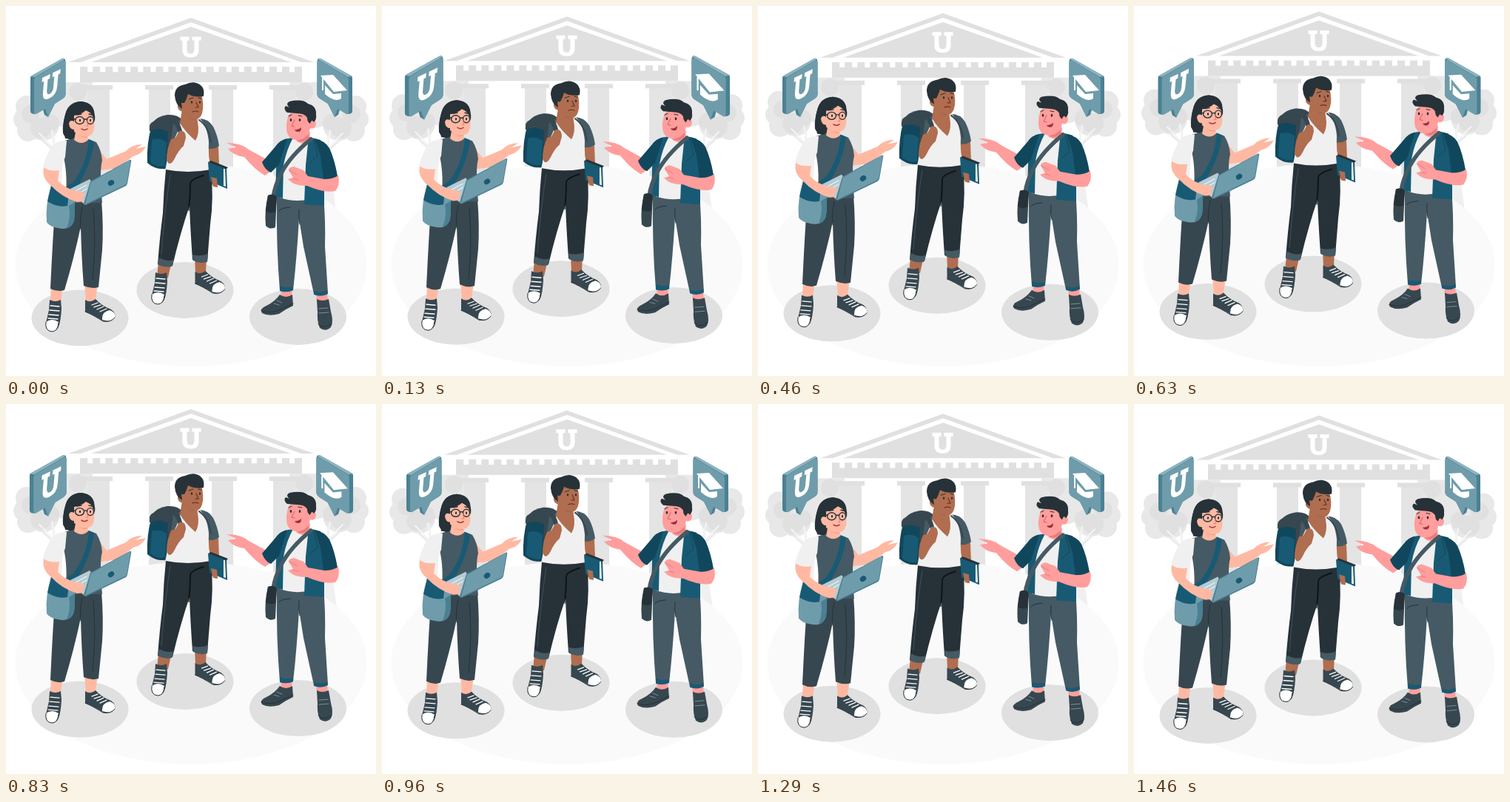
Write an HTML page that moves like this. It is 500x500 px and loops after 1500 ms.

```html
<!DOCTYPE html>
<html lang="en">
<head>
<meta charset="utf-8">
<style>
  html, body { margin: 0; width: 100%; height: 100%; overflow: hidden; background: #fff; }
  svg { display: block; width: 100vw; height: 100vh; }
  path, ellipse, circle, rect { stroke-linecap: round; stroke-linejoin: round; }
  .ink { fill: #263238; } .slate { fill: #37474f; } .steel { fill: #455a64; }
  .deep { fill: #185a74; } .dark { fill: #11475c; } .teal { fill: #6f9cab; } .mid { fill: #4b8093; }
  .white { fill: #fff; } .shirt { fill: #f0f0f0; } .grey { fill: #e0e0e0; }
  .fair { fill: #ffb9a3; } .brown { fill: #b06d4f; } .pink { fill: #ff9e9c; }
  .line { fill: none; stroke: #263238; }
  .lace { fill: none; stroke: #fff; stroke-width: 1.3; }
</style>
</head>
<body>
<svg viewBox="0 0 500 500">
<defs>
  <path id="letter" d="M-14-14h12v5h-3v12q0 6 5 6t5-6V-9H2v-5h12v5h-3V4q0 10-11 10T-11 4V-9h-3z"/>
  <g id="tree">
    <path fill="#f0f0f0" d="M53 285L66 190 78 190 72 285Z"/>
    <path fill="none" stroke="#ebebeb" stroke-width="3" d="M72 210Q68 196 52 184L38 168M70 204Q63 190 64 165M74 215Q90 180 98 150"/>
    <g fill="#e8e8e8">
      <circle cx="94" cy="104" r="23"/><circle cx="99" cy="128" r="21"/><circle cx="83" cy="142" r="23"/>
      <circle cx="28" cy="136" r="15"/><circle cx="24" cy="153" r="14"/><circle cx="30" cy="168" r="15"/>
      <circle cx="50" cy="160" r="22"/>
    </g>
    <g fill="#e0e0e0">
      <circle cx="97" cy="116" r="12"/><circle cx="33" cy="146" r="12"/>
      <circle cx="47" cy="165" r="14"/><circle cx="60" cy="158" r="12"/>
    </g>
    <path fill="none" stroke="#f5f5f5" stroke-width="2" d="M74 206Q62 188 45 172M66 191L62 168"/>
  </g>
  <g id="bubble">
    <path class="mid" d="M33 97Q33 95 35 94L75 71.500Q80 69 80.500 75V120Q80 123 77 125L66 132 57 150 52 147 50 140 39 146Q33 146 33 142Z"/>
    <path fill="#8db3bf" d="M33.500 95L75 71.500Q78 70 79.500 72L39 96Z"/>
    <path class="teal" d="M38 100Q38 97 41 95.500L77 74Q80 73 80.500 76V120Q80 123 77 125L66 132 57 150 53 139 41 146Q38 147 38 143Z"/>
  </g>
  <g id="shoeDown">
    <path class="slate" d="M59 397Q67 401 74 397L75 409Q74 426 71 434 68 440 62 440 53 439 54 428L58 411Z"/>
    <path class="white" d="M54 427Q62 421 71 427 71 440 62 440 53 439 54 427Z"/>
    <path class="lace" d="M60 405L72 406M59 411L72 412M58 417L71 418M57 422L70 423"/>
    <path class="line" d="M54 427Q52 439 62 440 70 440 71 428"/>
  </g>
  <g id="shoeSide">
    <path class="slate" d="M107 397Q114 402 121 396 129 405 142 410 149 415 147 421 142 428 132 426 117 417 107 413Z"/>
    <path class="white" d="M130 422Q130 413 140 411 149 414 147 421 142 428 130 424Z"/>
    <path class="lace" d="M116 404L124 401M119 407L128 404M123 410L132 406M127 413L136 409"/>
    <path class="line" d="M107 413Q117 417 131 426 142 428 147 421"/>
  </g>
</defs>

<g class="float">
  <use href="#tree"/>
  <use href="#tree" transform="matrix(-1 0 0 1 500 0)"/>
  <path class="white" d="M80 78L250 14 420 78V103H80Z"/>
  <path class="grey" d="M84 76L250 16 416 76H399L250 22 101 76Z"/>
  <path class="grey" d="M115 76L250 28 385 76Z"/>
  <use href="#letter" class="white" x="249.500" y="55.500"/>
  <rect class="grey" x="100" y="82" width="300" height="21"/>
  <path d="M110.200 85.500H400" fill="none" stroke="#fff" stroke-width="7.500" stroke-dasharray="7 10.050" style="stroke-linecap:butt"/>
  <path fill="#e4e4e4" d="M110 112h30v125h-30zM193 112h29v125h-29zM278 112h29v125h-29zM361 112h30v125h-30z"/>
  <path class="grey" d="M103 107h41v6h-41zM188 107h38v6h-38zM274 107h38v6h-38zM356 107h42v6h-42z"/>
</g>

<ellipse cx="250" cy="350" rx="237.500" ry="137" fill="#fafafa"/>

<g class="beat" style="transform-origin: 57px 110px">
  <use href="#bubble"/>
  <use href="#letter" class="white" transform="matrix(.88 -.42 -.1 1.2 60 108)"/>
</g>
<g class="beat" style="transform-origin: 444px 110px">
  <use href="#bubble" transform="matrix(-1 0 0 1 501 0)"/>
  <path class="white" d="M425 94L442 93 461 114 443 116ZM431 107L442 119 453 118V125Q445 131 431 119Z"/>
  <path d="M428 98V113" fill="none" stroke="#fff" stroke-width="2"/>
</g>

<g class="float">
  <g class="grey">
    <ellipse cx="100" cy="421.500" rx="65.500" ry="38"/>
    <ellipse cx="242" cy="384" rx="65.500" ry="38"/>
    <ellipse cx="394.500" cy="420" rx="65.500" ry="38"/>
  </g>

  <!-- woman with laptop -->
  <g>
    <path class="fair" d="M61 378H77L74 399Q67 403 60 399ZM106 375H124L121 397Q114 403 108 399Z"/>
    <use href="#shoeDown"/>
    <use href="#shoeSide"/>
    <path class="fair" d="M122 190L136 207 162 196Q170 187 184 187L175 193 189 190Q183 201 172 203 160 213 147 220L127 222Z"/>
    <path class="slate" d="M67 262H129Q132 300 130 330L125 380Q116 383 105 378 102 340 101 298 92 340 79 384 70 387 60 382 63 315 67 262Z"/>
    <path class="line" d="M103 271Q99 290 101 302M118 275Q122 320 117 370"/>
    <path class="ink" d="M90 181Q80 180 77 172 76 160 80 147 84 130 101 129 116 130 119 143L110 176Z"/>
    <path class="steel" d="M79 182L93 178Q101 187 111 180L122 184Q129 195 130 209 126 222 130 266H80Q84 230 78 205Z"/>
    <path class="fair" d="M95 165L110 173 111 181Q102 189 92 181Z"/>
    <path fill="#f0937f" d="M96 172Q104 180 110 177V173Z"/>
    <path class="fair" d="M88 149Q92 138 104 138 118 141 119 153 121 170 114 175 104 180 94 171 87 168 88 149Z"/>
    <path class="ink" d="M80 179Q76 160 80 147 84 130 101 129 116 130 119 142 121 150 120 157 118 145 108 141 101 147 92 148 92 158 92 168L90 180Z"/>
    <path class="fair" d="M92 156Q86 153 85 159 86 167 92 167Z"/>
    <g class="line" style="stroke-width:1.4">
      <ellipse cx="99.500" cy="154.500" rx="6" ry="5"/><ellipse cx="114" cy="154.500" rx="4.500" ry="5"/>
      <path d="M106 153H109M87 153L94 153M96 147L102 146M112 146L116 147"/>
    </g>
    <path class="ink" d="M99 153h2v3h-2zM113 153h2v3h-2z"/>
    <path d="M109 155L111 162H108" fill="none" stroke="#e77d6e"/>
    <path d="M102 166Q106 169 110 166" fill="none" stroke="#a33" stroke-width="1.500"/>
    <path class="deep" d="M112 180L119 183Q116 212 96 245L73 258 70 252 91 238Q110 212 112 180Z"/>
    <path class="teal" d="M61 244Q75 241 94 252L92 290Q88 301 78 301 60 300 55 292 53 268 61 244Z"/>
    <path class="mid" d="M85 270Q88 285 82 300 92 299 93 282L93 265Z"/>
    <path class="deep" d="M61 243Q72 240 85 253L83 270Q70 273 56 264Z"/>
    <path class="shirt" d="M82 182Q68 181 61 191 54 203 50 217 60 224 73 222L80 204Z"/>
    <path fill="#b3ccd4" d="M87 247L113 234 116 238 107 269 95 258Z"/>
    <path d="M94 250L109 242M97 254L109 247" stroke="#fff" fill="none"/>
    <path class="fair" d="M51 218Q48 232 60 242 76 259 96 265L106 264 103 258 108 256Q104 250 96 250 80 247 70 236L72 222Q60 224 51 218Z"/>
    <path class="mid" d="M114 237L167 208Q170 207 169 211L164 240Q163 243 160 244L108 269 105 267Z"/>
    <path class="teal" d="M115 238L166 209Q169 208 168 211L163 240 160 242 107 268Z"/>
    <ellipse class="deep" cx="142" cy="239" rx="4.500" ry="3.500" transform="rotate(-35 142 239)"/>
  </g>

  <!-- student with backpack -->
  <g>
    <path class="brown" d="M206 345H224L219 367Q212 371 204 367ZM255 340H271L270 360Q264 366 256 361Z"/>
    <use href="#shoeDown" x="143" y="-37"/>
    <use href="#shoeSide" x="148.500" y="-38"/>
    <path class="slate" d="M198 158Q204 149 218 147 232 146 238 154L229 215Q214 226 196 214 190 190 196 165Z"/>
    <path class="dark" d="M196 166Q207 160 219 168L217 218Q206 224 191 212 190 185 196 166Z"/>
    <path class="deep" d="M197 181Q207 177 217 184L215 216Q205 219 195 211Z"/>
    <path class="slate" d="M194 164Q193 157 206 153L222 158 218 170Q208 163 194 169Z"/>
    <path class="brown" d="M270 188L287 190 288 216Q289 235 284 245L277 240 277 218Z"/>
    <path class="steel" d="M258 152Q273 151 280 163 286 175 288 189 280 195 271 192L262 175ZM226 158L238 154 236 176 222 190Z"/>
    <path class="shirt" d="M237 154L262 152Q272 162 274 184 273 204 277 222 245 229 215 222 219 204 219 192 230 180 237 154Z"/>
    <path class="ink" d="M216 221Q245 227 277 221 281 260 276 295L272 345Q262 348 252 343 249 300 248 270 236 305 225 351 215 354 205 349 208 310 212 280 213 250 216 221Z"/>
    <path d="M267 229Q250 234 249 240 249 257 247 276" fill="none" stroke="#000" stroke-width="2" opacity=".6"/>
    <path d="M222 228Q215 270 210 335" fill="none" stroke="#455a64" stroke-width=".8"/>
    <path class="steel" d="M207 340Q217 346 227 343L224 352Q214 354 205 349ZM252 336Q262 339 273 335L272 346Q262 349 253 344Z"/>
    <path class="brown" d="M238 140L258 148 259 157Q262 172 256 182 242 170 235 158Z"/>
    <path fill="#8c4f38" d="M243 146Q251 156 257 152V148Z"/>
    <path class="brown" d="M236 122Q246 112 264 119 268 134 265 145 262 154 254 153 243 151 239 143 231 141 232 134 234 130 237 133Z"/>
    <path class="ink" d="M238 139Q229 134 228 121 228 108 242 106 254 100 263 107 269 112 267 122 255 124 246 119 244 126 241 131L237 131Z"/>
    <ellipse class="ink" cx="251" cy="130" rx="1.200" ry="1.800"/><ellipse class="ink" cx="262" cy="130" rx="1.200" ry="1.800"/>
    <path class="line" d="M247 126L253 124M260 124L264 125"/>
    <path d="M257 130L260 137H256M252 143Q256 141 260 143" fill="none" stroke="#6e3022" stroke-width="1.200"/>
    <path d="M217 153Q231 152 235 169" fill="none" stroke="#37474f" stroke-width="6"/>
    <path d="M261 154Q274 163 277 184" fill="none" stroke="#37474f" stroke-width="2"/>
    <path class="brown" d="M223 180L229 178 234 169Q243 167 243 178L240 189Q233 195 228 206 221 219 217 208 217 194 223 180Z"/>
    <path class="deep" d="M273 211L298 219 299 247 275 237Z"/>
    <path class="white" d="M294 220L296 220 297 244 294 243Z"/>
    <path class="ink" d="M273 211L277 209 300 218 298 220Z"/>
    <path class="brown" d="M277 231L285 233 286 245 280 244Z"/>
  </g>

  <!-- man with shoulder bag -->
  <g>
    <path class="pink" d="M371 380H387L386 393Q379 400 372 394ZM419 386H434L435 401Q428 406 420 400Z"/>
    <path class="slate" d="M370 390Q378 396 387 390L388 405Q379 409 369 416 355 420 346 415 342 409 352 405 364 399 370 390ZM420 396Q427 400 436 396L439 413Q443 427 439 434 432 441 424 435 420 425 421 414Z"/>
    <path class="line" d="M345 412Q358 416 369 411L388 402M422 430Q430 438 440 429"/>
    <path d="M362 402L369 404M366 398L373 401M423 409L435 408M423 415L436 414" fill="none" stroke="#78909c"/>
    <path class="steel" d="M366 257H429Q432 290 431 325L435 388Q426 393 416 389L402 325 396 287Q393 340 388 384 379 388 370 384 365 325 366 257Z"/>
    <path class="line" d="M396 275Q395 285 397 295M384 272Q370 273 369 277"/>
    <path class="deep" d="M370 378Q379 382 388 379V384Q379 388 370 385ZM416 385Q426 389 434 384L435 389Q426 394 416 390Z"/>
    <path class="shirt" d="M381 180L413 178 412 261Q390 266 370 259Z"/>
    <path class="pink" d="M350 206L328 194Q318 185 298 185L311 191 300 193Q307 202 322 204 337 222 350 229L360 222Z"/>
    <path class="deep" d="M388 178Q374 179 366 188L364 257 374 260 375 215Q379 194 388 178Z"/>
    <path class="dark" d="M380 179Q370 181 364 190L346 211Q350 222 358 225L369 214Z"/>
    <path class="deep" d="M409 177L425 181 436 230 430 234 430 270 403 268 405 215Z"/>
    <path class="dark" d="M417 179Q431 182 437 192 444 207 448 230 440 236 429 234L425 203Z"/>
    <path class="line" d="M416 181L421 203 410 212" opacity=".6"/>
    <path class="pink" d="M393 172L411 170 410 181Q402 190 392 182Z"/>
    <path fill="#e97b7d" d="M394 181Q403 180 409 173V178Q402 186 394 182Z"/>
    <path class="pink" d="M382 147Q391 138 407 143L415 154Q421 156 418 163 415 167 411 165 409 178 396 181 384 182 380 172 377 161 382 147Z"/>
    <path class="ink" d="M380 144Q374 139 378 135L383 137Q377 132 383 129 401 125 408 132 420 135 419 147 420 153 416 157 413 152 411 159 407 157 407 151 404 145 393 145 380 144Z"/>
    <ellipse class="ink" cx="385" cy="154" rx="1.300" ry="2"/><ellipse class="ink" cx="397" cy="154" rx="1.300" ry="2"/>
    <path class="line" d="M382 149L386 147M395 148L400 149"/>
    <path d="M390 154L386 162 390 163" fill="none" stroke="#d9585d"/>
    <path d="M390 167Q395 168 399 164 399 170 395 170 391 170 390 167Z" fill="#9c2f3c"/>
    <path d="M412 180Q384 203 372 226 363 243 361 259" fill="none" stroke="#455a64" stroke-width="5.500"/>
    <path class="slate" d="M354 256Q362 253 366 258L364 299Q357 303 351 297 349 276 354 256Z"/>
    <path class="ink" d="M354 256Q362 253 366 258L364 278Q357 281 351 277Z"/>
    <path class="pink" d="M430 234Q442 234 449 229 452 242 445 250 430 253 407 243 394 243 387 239L381 234 388 232 382 222Q382 218 389 217L402 222 408 230Z"/>
    <path d="M383 222L393 228M388 233L395 235" fill="none" stroke="#e97b7d"/>
  </g>
</g>
</svg>

<script>
  const LOOP = 1500, RISE = 10;
  // Two pulses per loop: progress, scale
  const pulse = [[0, 1], [.1, 1.1], [.3, 1], [.4, 1], [.5, 1.1], [.6, 1], [1, 1]];
  const floating = document.querySelectorAll('.float');
  const beating = document.querySelectorAll('.beat');

  function scaleAt(p) {
    const i = pulse.findIndex(key => key[0] > p);
    const [p0, s0] = pulse[i - 1], [p1, s1] = pulse[i];
    return s0 + (s1 - s0) * (p - p0) / (p1 - p0);
  }

  function draw() {
    const p = performance.now() % LOOP / LOOP;
    const y = -RISE * (1 - Math.abs(1 - 2 * p));
    floating.forEach(node => node.setAttribute('transform', `translate(0 ${y})`));
    beating.forEach(node => node.style.transform = `scale(${scaleAt(p)})`);
    requestAnimationFrame(draw);
  }
  draw();
</script>
</body>
</html>
```
